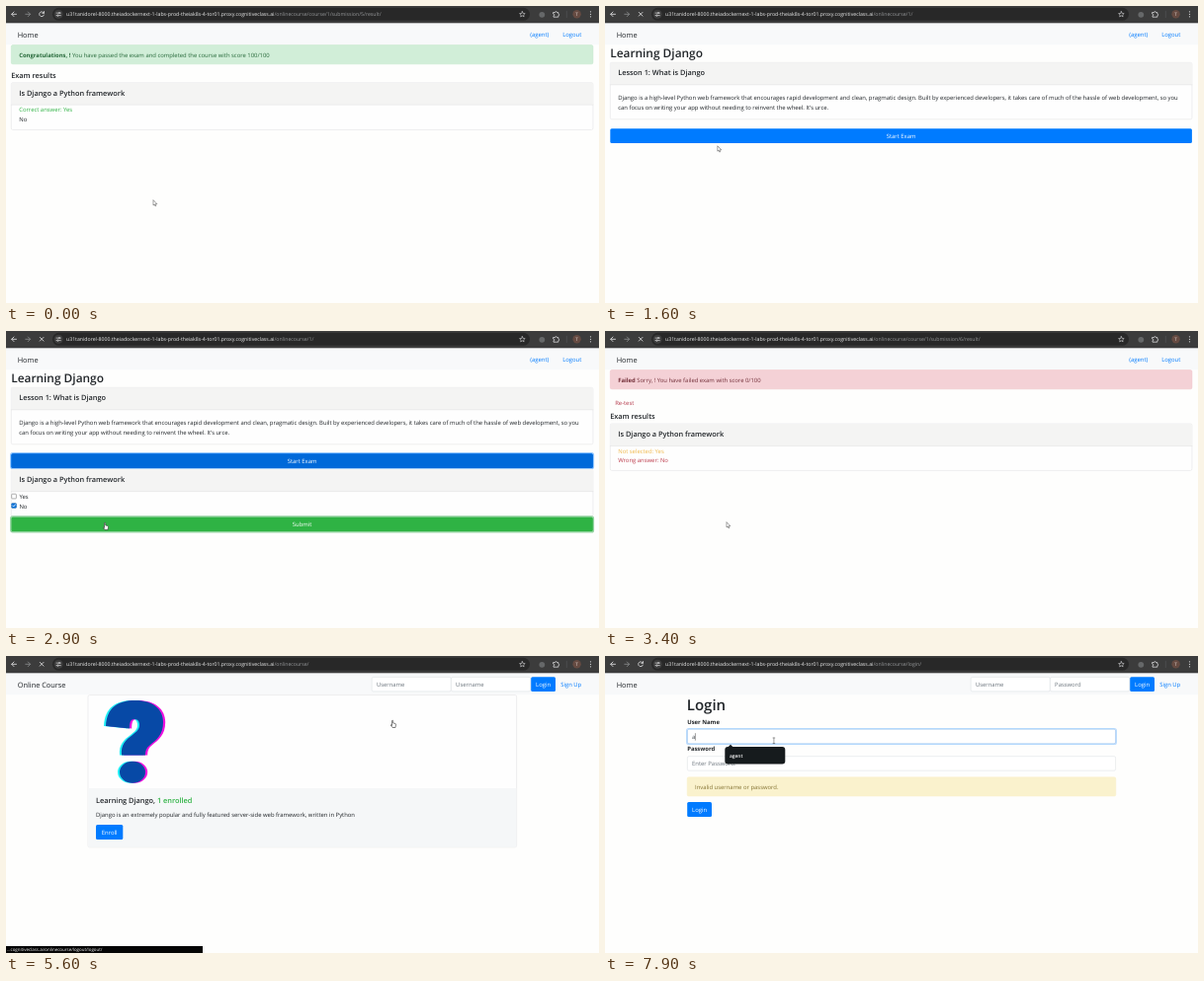
Animation, 600 px wide and 301 px high, one loop 8 s. Source, as an HTML page:

```html
<!DOCTYPE html>
<html lang="en">
<head>
<meta charset="utf-8">
<title>Online course walkthrough</title>
<style>
html, body { margin: 0; width: 100%; height: 100%; overflow: hidden; background: #fefefd; }
svg { display: block; width: 600px; height: 301px; }
text { font-family: "Open Sans", "Noto Sans", sans-serif; text-rendering: geometricPrecision; white-space: pre; }
</style>
</head>
<body>
<svg id="stage" viewBox="0 0 600 301" xmlns="http://www.w3.org/2000/svg"></svg>
<script>
const LOOP = 8000, STEP = 100;
const BODY = 5.9, H5 = 7.37, H2 = 11.9, H1 = 15;
const LEFT = 83.2, WIDTH = 433.6, CONTROL = 14.85;
const INK = '#212529', BLUE = '#007bff', GREEN = '#2fb344', MUTED = '#6c757d';

// Drawing helpers
const text = (x, y, s, fill = INK, size = BODY, weight = 400, anchor = 'start') =>
  `<text x="${x}" y="${y}" fill="${fill}" font-size="${size}" font-weight="${weight}" text-anchor="${anchor}">${s}</text>`;
const rect = (x, y, w, h, fill, stroke = 'none', r = 0, line = 0.5) =>
  `<rect x="${x}" y="${y}" width="${w}" height="${h}" fill="${fill}" stroke="${stroke}" stroke-width="${line}" rx="${r}"/>`;
const path = (d, stroke, width = 0.9, fill = 'none') =>
  `<path d="${d}" fill="${fill}" stroke="${stroke}" stroke-width="${width}" stroke-linecap="round" stroke-linejoin="round"/>`;
const circle = (x, y, r, fill, stroke = 'none') =>
  `<circle cx="${x}" cy="${y}" r="${r}" fill="${fill}" stroke="${stroke}" stroke-width=".8"/>`;
const group = (id, body) => `<g id="${id}">${body}</g>`;

const heading = (x, y, s, size = H5, fill = INK) => text(x, y, s, fill, size, 600);
const button = (x, y, w, label, fill = BLUE) =>
  rect(x, y, w, CONTROL, fill, 'none', 1.5) + text(x + w / 2, y + 9.8, label, '#fff', BODY, 400, 'middle');
const input = (x, y, w, hint) =>
  rect(x + 0.2, y + 0.2, w - 0.4, CONTROL - 0.4, '#fff', '#ced4da', 1.5, 0.4) + text(x + 4.9, y + 9.8, hint, MUTED);
const alertBox = (x, y, w, fill, stroke) => rect(x, y, w, 19.2, fill, stroke, 1.5);
const card = (y, h, title) =>
  rect(5.3, y, 588.6, h, '#fefefe', '#dedfe0', 1.5) +
  rect(5.5, y + 0.2, 588.2, 22.2, '#f4f4f3') +
  path(`M5.3 ${y + 22.5}H593.9`, '#dcdddd', 0.5) + heading(13.2, y + 12.8, title);
const glow = (x, y, w, h, color) => rect(x, y, w, h, 'none', color, 2, 1.2);

function toolbar() {
  const light = '#d8d9da';
  return rect(0, 0, 600, 17.3, '#3c3c3c') + rect(47, 1.8, 483, 13, '#282828', 'none', 6.5) +
    path('M10.5 8.3H5.8M8 6L5.7 8.3L8 10.6', light) +
    path('M19.8 8.3H24.5M22.3 6L24.6 8.3L22.3 10.6', '#858788') +
    group('reload', path('M38.2 7A2.4 2.4 0 1 0 38.4 9.1M38.5 5.6V7.3H36.8', light)) +
    group('stop', path('M34.3 6.4L38 10.1M38 6.4L34.3 10.1', light)) +
    circle(53.2, 8.3, 4.6, '#3c3c3c') +
    path('M51 7.1H53M55 7.1H55.4M51 9.6H51.4M53.4 9.6H55.4', light, 0.7) +
    circle(54, 7.1, 0.7, 'none', light) + circle(52.4, 9.6, 0.7, 'none', light) +
    `<text x="61" y="10.2" font-size="5.19" fill="#eceded">u31tanidorel-8000.theiadockernext-1-labs-prod-theiak8s-4-tor01.proxy.cognitiveclass.ai<tspan id="route" fill="#96989a"></tspan></text>` +
    path('M522.4 5.6L523.2 7.4L525.2 7.6L523.7 8.9L524.1 10.9L522.4 9.9L520.7 10.9L521.1 8.9L519.6 7.6L521.6 7.4Z', light, 0.6) +
    circle(542.3, 8.8, 2.9, '#666869') +
    path('M554 6.5H555.6A.9.9 0 0 1 557.4 6.5H558.8V8A.9.9 0 0 1 558.8 9.8V11.2H554V9.8A.9.9 0 0 0 554 8Z', light, 0.8) +
    path('M567.3 5.2V11.6', '#5c5e60', 0.5) +
    circle(577.6, 8.3, 4.2, '#664b42') + text(577.6, 10, 'T', '#f0e4df', 4.6, 400, 'middle') +
    [5.8, 8.3, 10.8].map(y => circle(591.5, y, 0.65, light)).join('');
}

const userLinks = () => text(530.3, 31, '(agent)', BLUE) + text(563.2, 31, 'Logout', BLUE);
const loginBar = hint => input(370, 21.2, 80.5, 'Username') + input(450.2, 21.2, 80.5, hint) +
  button(531.2, 21.2, 24.8, 'Login') + text(561.2, 31, 'Sign Up', BLUE);
const navbar = (brand, links) => rect(0, 17, 600, 22.3, '#f8f9fa') + text(11.7, 31.6, brand, INK, H5) + links;

function question() {
  const d = 'M101 71C102 52 113 45 131 45C149 45 159 54 159 67C159 80 152 85 146 90C142 93 141 96 141 100.5H117C116 90 121 85 128 80C133 76 135 74 135 70C135 66 133 64 130 64C126 64 125 67 125 73.5Z' +
    'M115 117.7A13 11 0 0 1 141 117.7A13 11 0 0 1 115 117.7Z';
  return [[-2, '#20eef5'], [2.2, '#ee10df'], [0, '#0749a6']]
    .map(([dx, fill]) => `<path transform="translate(${dx})" d="${d}" fill="${fill}"/>`).join('');
}

const courseCard = (action, width) =>
  rect(LEFT - 0.2, 39.6, WIDTH, 154.2, '#fefefe', '#dedfe0', 1.5) + rect(LEFT, 134, WIDTH - 0.4, 59.6, '#f5f7f8') + question() +
  `<text x="91" y="149.2" font-size="${H5}" font-weight="600" fill="${INK}">Learning Django, <tspan fill="${GREEN}">1 enrolled</tspan></text>` +
  text(91, 162.6, 'Django is an extremely popular and fully featured server-side web framework, written in Python') +
  button(91, 171.1, width, action);

const checkbox = y => rect(5.7, y, 4.7, 4.7, '#fff', '#777', 0.8, 0.6);

const pages = {
  passed: navbar('Home', userLinks()) + alertBox(5.3, 39.6, 588.6, '#d1eed8', '#c0e4c8') +
    `<text x="13.2" y="51.7" font-size="${BODY}" fill="#27693a"><tspan font-weight="700">Congratulations, !</tspan> You have passed the exam and completed the course with score 100/100</text>` +
    heading(5.2, 73, 'Exam results') + card(77.7, 47.8, 'Is Django a Python framework') +
    text(13.2, 107.4, 'Correct answer: Yes', GREEN) + text(13.2, 116.9, 'No'),

  courses: navbar('Online Course', userLinks()) + courseCard('Enter', 25.8),

  lesson: navbar('Home', userLinks()) + heading(5.2, 52, 'Learning Django', H2) +
    card(57.3, 57.5, 'Lesson 1: What is Django') +
    text(13.2, 95.2, 'Django is a high-level Python web framework that encourages rapid development and clean, pragmatic design. Built by experienced developers, it takes care of much of the hassle of web development, so you') +
    text(13.2, 104.6, 'can focus on writing your app without needing to reinvent the wheel. It’s urce.') +
    button(5.3, 124.2, 588.6, 'Start Exam') +
    group('exam', button(5.3, 124.2, 588.6, 'Start Exam', '#0069d9') + glow(4.7, 123.6, 589.8, 16, 'rgba(38,143,255,.5)') +
      card(140.1, 48, 'Is Django a Python framework') +
      checkbox(165.2) + checkbox(174.6) + text(13.4, 170.4, 'Yes') + text(13.4, 179.8, 'No') +
      group('tick', rect(5.5, 174.4, 5.1, 5.1, '#0b73da', 'none', 0.8) + path('M6.7 177L7.7 178L9.5 175.8', '#fff', 0.8)) +
      button(5.3, 188.5, 588.6, 'Submit', GREEN) +
      group('submitFocus', glow(4.7, 187.9, 589.8, 16, 'rgba(40,167,69,.5)'))),

  failed: navbar('Home', userLinks()) + alertBox(5.3, 39.6, 588.6, '#f4d1d6', '#efc1c7') +
    `<text x="13.2" y="51.7" font-size="${BODY}" fill="#74303a"><tspan font-weight="700">Failed</tspan> Sorry, ! You have failed exam with score 0/100</text>` +
    text(10.2, 75.1, 'Re-test', '#b53a4b') + heading(5.2, 89.2, 'Exam results') +
    card(94, 47.4, 'Is Django a Python framework') +
    text(13.2, 123.7, 'Not selected: Yes', '#f0b94c') + text(13.2, 133.1, 'Wrong answer: No', '#bd3c4c'),

  visitor: navbar('Online Course', loginBar('Username')) + courseCard('Enroll', 27.3),

  login: navbar('Home', loginBar('Password')) + heading(82.8, 54.7, 'Login', H1) +
    text(LEFT, 68.6, 'User Name', INK, BODY, 700) + input(LEFT, 74.1, WIDTH, 'Enter User Name:') +
    text(LEFT, 96.2, 'Password', INK, BODY, 700) + input(LEFT, 101.5, WIDTH, 'Enter Password:') +
    alertBox(LEFT, 122.8, WIDTH, '#faf2cd', '#f8eec4') + text(91, 134.6, 'Invalid username or password.', '#857434') +
    button(LEFT, 148.1, 24.8, 'Login') +
    group('focus', rect(LEFT + 0.2, 74.3, WIDTH - 0.4, CONTROL - 0.4, 'none', '#80bdff', 1.5, 0.4) +
      glow(LEFT - 0.6, 73.5, WIDTH + 1.2, 16, 'rgba(0,123,255,.25)')) +
    group('typed', rect(85, 75.5, 60, 12, '#fff') + text(88, 83.9, 'a', '#495057') + path('M91.4 78.6V85.2', '#222', 0.45)) +
    group('popup', rect(121.3, 92, 61, 17.4, '#161b1d', 'none', 3) + path('M124.5 92.2L127 89.8L129.5 92.2Z', 'none', 0, '#161b1d') +
      text(126, 102.7, 'agent', '#fff', 4.9, 600)),
};

const stage = document.getElementById('stage');
stage.innerHTML = rect(0, 0, 600, 301, '#fefefd') +
  Object.entries(pages).map(([id, body]) => group(id, body)).join('') + toolbar() +
  group('status', rect(0, 294, 199, 7, '#050505') + '<text id="link" x="1" y="299.4" font-size="4.45" fill="#eee"></text>') +
  group('pointer',
    group('arrow', path('M0 0V5L1.2 4L2 5.9L2.8 5.5L2 3.7H3.5Z', '#444', 0.5, '#fff')) +
    group('hand', path('M1.5 5V.8A.6.6 0 0 1 2.7 .8V3L5 3.5Q5.6 3.7 5.5 4.5L5 7.5H2L.2 5Q.4 4.2 1.5 5Z', '#333', 0.6, '#fff')) +
    group('beam', path('M0 0H1.8M.9 0V5.6M0 5.6H1.8', '#444', 0.5)));

const el = id => document.getElementById(id);
const show = (id, on) => { el(id).style.display = on ? '' : 'none'; };

// [start, page, path]
const visits = [
  [0, 'passed', 'course/1/submission/5/result/'], [700, 'courses', ''], [1400, 'lesson', '1/'],
  [3100, 'failed', 'course/1/submission/6/result/'], [5000, 'courses', ''], [5500, 'visitor', ''], [6800, 'login', 'login/'],
];
// [start, end]
const loading = [[500, 1000], [1200, 1700], [2800, 3700], [4700, 5200], [5400, 5900], [6500, 7200]];
const hands = [[400, 800], [1100, 1500], [1700, 2000], [2700, 3100], [4000, 4200], [4500, 5000], [5300, 5700], [6300, 6900]];
const beams = [[7500, 8000]];
// [start, end, path]
const hovers = [[400, 1000, 'onlinecourse/'], [4600, 5100, 'onlinecourse/'], [5300, 5800, 'logout/logout/']];
// [time, x, y]
const moves = [
  [0, 149, 197], [100, 149, 197], [400, 20, 27], [700, 20, 27], [800, 70, 128], [1100, 102, 177], [1400, 102, 177],
  [1700, 118, 130], [1900, 118, 130], [2300, 11, 177], [2400, 8, 176], [2700, 98, 194], [3100, 98, 194],
  [3400, 123, 194], [3700, 123, 194], [4000, 18, 71], [4200, 18, 71], [4500, 20, 28], [5000, 20, 28],
  [5300, 572, 27], [5500, 572, 27], [5600, 389, 65], [5900, 392, 88], [6300, 541, 28], [6700, 541, 28],
  [7000, 264, 133], [7300, 218, 172], [7500, 152, 80], [7700, 152, 80], [7900, 170, 83], [8000, 170, 83],
];

const during = (list, t) => list.find(([a, b]) => t >= a && t < b);
const ease = p => p * p * (3 - 2 * p);

function pointerAt(t) {
  const i = moves.findIndex(([end]) => end > t);
  const [t0, x0, y0] = moves[i - 1], [t1, x1, y1] = moves[i];
  const p = ease((t - t0) / (t1 - t0));
  return [x0 + (x1 - x0) * p, y0 + (y1 - y0) * p];
}

function draw(t) {
  const [, page, route] = visits.filter(([start]) => t >= start).pop();
  for (const id in pages) show(id, id === page);
  el('route').textContent = '/onlinecourse/' + route;

  const busy = Boolean(during(loading, t));
  show('stop', busy);
  show('reload', !busy);

  const hover = during(hovers, t);
  show('status', hover);
  if (hover) el('link').textContent = '...cognitiveclass.ai/onlinecourse/' + hover[2];

  show('exam', t >= 1900);
  show('tick', t >= 2400);
  show('submitFocus', t >= 2800);
  show('focus', t >= 7500);
  show('popup', t >= 7600);
  show('typed', t >= 7800);

  const shape = during(hands, t) ? 'hand' : during(beams, t) ? 'beam' : 'arrow';
  for (const id of ['hand', 'beam', 'arrow']) show(id, id === shape);
  el('pointer').setAttribute('transform', `translate(${pointerAt(t)})`);
}

const origin = performance.now();
let last = -1;
function tick(now) {
  const t = Math.floor((Math.max(0, now - origin) % LOOP) / STEP) * STEP;
  if (t !== last) draw(last = t);
  requestAnimationFrame(tick);
}
draw(0);
requestAnimationFrame(tick);
</script>
</body>
</html>
```
